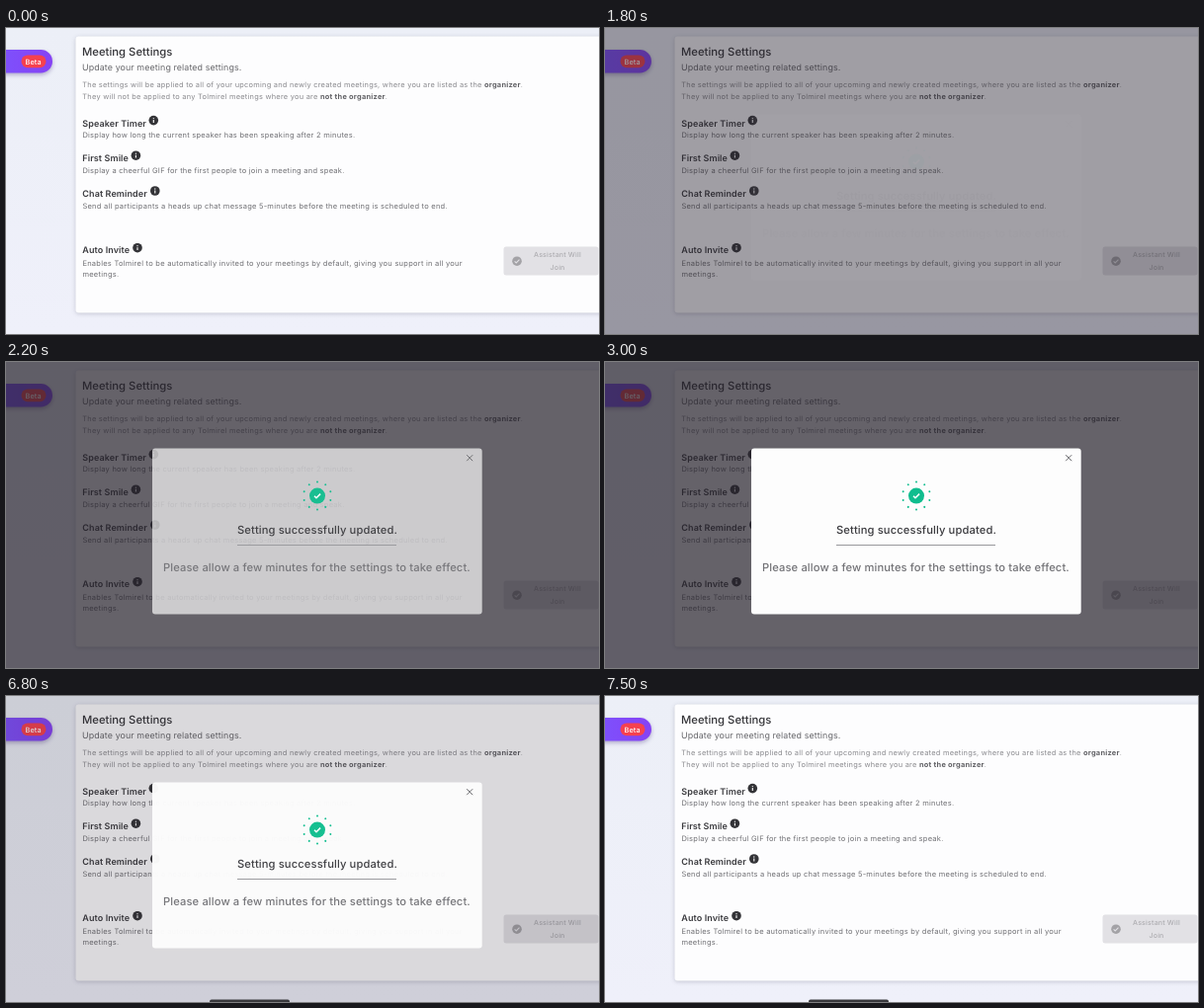
Animation of 600x310 px, one loop 8 s. Source, as an HTML page:

```html
<!DOCTYPE html>
<html lang="en">
<head>
<meta charset="utf-8">
<title>Meeting Settings</title>
<style>
  html, body { margin: 0; width: 100%; height: 100%; overflow: hidden; background: #eef0f8; }
  svg { display: block; width: 600px; height: 310px; }
  text { font-family: Inter, sans-serif; text-rendering: geometricPrecision; white-space: pre; }

  .title { font-size: 11.3px; font-weight: 500; fill: #353539; }
  .sub { font-size: 8.9px; letter-spacing: .1px; fill: #68686c; }
  .note { font-size: 7.4px; letter-spacing: .26px; fill: #8a8a8e; }
  .note tspan { font-weight: 700; fill: #616165; }
  .head { font-size: 9px; font-weight: 600; letter-spacing: .1px; fill: #3a3a3e; }
  .desc { font-size: 7.5px; letter-spacing: .25px; fill: #707074; }
  .btn { font-size: 7px; font-weight: 500; letter-spacing: .2px; fill: #adacb0; text-anchor: middle; }
  .beta { font-size: 7.3px; font-weight: 500; letter-spacing: .2px; fill: #fff; }
  .msg, .hint { font-size: 11.2px; font-weight: 500; letter-spacing: .11px; }
  .msg { fill: #3b3b3f; }
  .hint { fill: #727276; }

  .card { filter: drop-shadow(0 1px 2px rgba(40, 40, 70, .22)); }
  .pill { filter: drop-shadow(0 2px 2px rgba(60, 40, 120, .35)); }

  .dim, .box, .content, .bar { opacity: 0; animation: 8s linear infinite; }
  .dim { animation-name: dim; }
  .box { animation-name: box; }
  .content { animation-name: content; }
  .bar { animation-name: bar; animation-timing-function: step-end; }

  /* 1.25% is one 100 ms step */
  @keyframes dim {
    0% { opacity: 0; }
    11.25% { opacity: 0; animation-timing-function: steps(8); }
    21.25% { opacity: .15; animation-timing-function: steps(1); }
    22.5% { opacity: .43; animation-timing-function: steps(2); }
    25% { opacity: .68; animation-timing-function: steps(2); }
    27.5% { opacity: .7; }
    83.75% { opacity: .7; animation-timing-function: steps(1); }
    85% { opacity: .16; animation-timing-function: steps(3); }
    88.75%, 100% { opacity: 0; }
  }
  @keyframes box {
    0% { opacity: 0; }
    21.25% { opacity: 0; animation-timing-function: steps(1); }
    22.5% { opacity: .03; animation-timing-function: steps(2); }
    25% { opacity: .36; animation-timing-function: steps(4); }
    30% { opacity: 1; }
    83.75% { opacity: 1; animation-timing-function: steps(1); }
    85% { opacity: .97; animation-timing-function: steps(5); }
    91.25%, 100% { opacity: 0; }
  }
  @keyframes content {
    0% { opacity: 0; }
    21.25% { opacity: 0; animation-timing-function: steps(1); }
    22.5% { opacity: .03; animation-timing-function: steps(2); }
    25% { opacity: .85; animation-timing-function: steps(3); }
    28.75% { opacity: 1; }
    83.75% { opacity: 1; animation-timing-function: steps(1); }
    85% { opacity: .97; animation-timing-function: steps(5); }
    91.25%, 100% { opacity: 0; }
  }
  @keyframes bar {
    0% { opacity: 0; }
    85%, 100% { opacity: 1; }
  }
</style>
</head>
<body>
<svg viewBox="0 0 600 310">
  <defs>
    <linearGradient id="page" x2="0" y2="1">
      <stop stop-color="#eceff7"/>
      <stop offset="1" stop-color="#eff0fa"/>
    </linearGradient>
    <linearGradient id="violet">
      <stop stop-color="#7b55ff"/>
      <stop offset="1" stop-color="#8642f4"/>
    </linearGradient>
    <g id="info">
      <circle r="4.8" fill="#333337"/>
      <path d="M0 -.5V2.4" stroke="#fff" stroke-width="1.1"/>
      <circle cy="-2" r=".65" fill="#fff"/>
    </g>
    <path id="tick" d="M-3 .1L-1 2.1L3.1 -2" fill="none"/>
    <g id="dots" fill="#0fbd8e">
      <circle cy="-14" r="1"/>
      <circle cy="-14" r="1" transform="rotate(36)"/>
      <circle cy="-14" r="1" transform="rotate(72)"/>
      <circle cy="-14" r="1" transform="rotate(108)"/>
      <circle cy="-14" r="1" transform="rotate(144)"/>
    </g>
  </defs>

  <rect width="600" height="310" fill="url(#page)"/>

  <rect class="pill" x="-20" y="22" width="67" height="23.5" rx="11.75" fill="url(#violet)"/>
  <rect x="15.5" y="27.5" width="25" height="12.7" rx="6.35" fill="#f6414f"/>
  <text class="beta" x="19.4" y="36.5">Beta</text>

  <rect class="card" x="70.5" y="8.5" width="560" height="280" rx="3" fill="#fdfdfe"/>
  <text class="title" x="77" y="27.9">Meeting Settings</text>
  <text class="sub" x="77" y="43">Update your meeting related settings.</text>
  <text class="note" x="77.3" y="59.8">The settings will be applied to all of your upcoming and newly created meetings, where you are listed as the <tspan>organizer</tspan>.</text>
  <text class="note" x="77.3" y="71.6">They will not be applied to any Tolmirel meetings where you are <tspan>not the organizer</tspan>.</text>

  <text class="head" x="77.3" y="99.5">Speaker Timer</text>
  <use href="#info" x="149.3" y="93.6"/>
  <text class="desc" x="77.4" y="111.3">Display how long the current speaker has been speaking after 2 minutes.</text>

  <text class="head" x="77.3" y="135">First Smile</text>
  <use href="#info" x="131.4" y="129.2"/>
  <text class="desc" x="77.4" y="147.2">Display a cheerful GIF for the first people to join a meeting and speak.</text>

  <text class="head" x="77.3" y="170.6">Chat Reminder</text>
  <use href="#info" x="150.8" y="165"/>
  <text class="desc" x="77.4" y="182.8">Send all participants a heads up chat message 5-minutes before the meeting is scheduled to end.</text>

  <text class="head" x="77.3" y="228.3">Auto Invite</text>
  <use href="#info" x="133" y="222.7"/>
  <text class="desc" x="77.4" y="240.6">Enables Tolmirel to be automatically invited to your meetings by default, giving you support in all your</text>
  <text class="desc" x="77.4" y="252.4">meetings.</text>

  <rect x="503.5" y="221.5" width="96" height="29" rx="2.5" fill="#e2e1e5"/>
  <circle cx="517" cy="236.2" r="4.8" fill="#a3a2a6"/>
  <use href="#tick" transform="translate(517 236.2) scale(.8)" stroke="#e2e1e5" stroke-width="1.4"/>
  <text class="btn" x="558" y="232.3">Assistant Will</text>
  <text class="btn" x="558" y="244.6">Join</text>

  <rect class="dim" width="600" height="310" fill="#26222c"/>

  <rect class="box" x="148" y="87.5" width="333.7" height="168" rx="3" fill="#fdfdfd"/>
  <g class="content">
    <path d="M466.2 94.2l6 6m0 -6l-6 6" stroke="#68686c"/>
    <g transform="translate(315 135.6)">
      <use href="#dots"/>
      <use href="#dots" transform="rotate(180)"/>
      <circle r="8" fill="#0fbd8e"/>
      <use href="#tick" stroke="#fff" stroke-width="1.5"/>
    </g>
    <text class="msg" x="234" y="174.4">Setting successfully updated.</text>
    <path d="M234 185.5H395" stroke="#98989c"/>
    <text class="hint" x="159" y="211.8">Please allow a few minutes for the settings to take effect.</text>
  </g>

  <rect class="bar" x="206" y="307.5" width="81" height="10" rx="2" fill="#38383c"/>
</svg>
</body>
</html>
```
